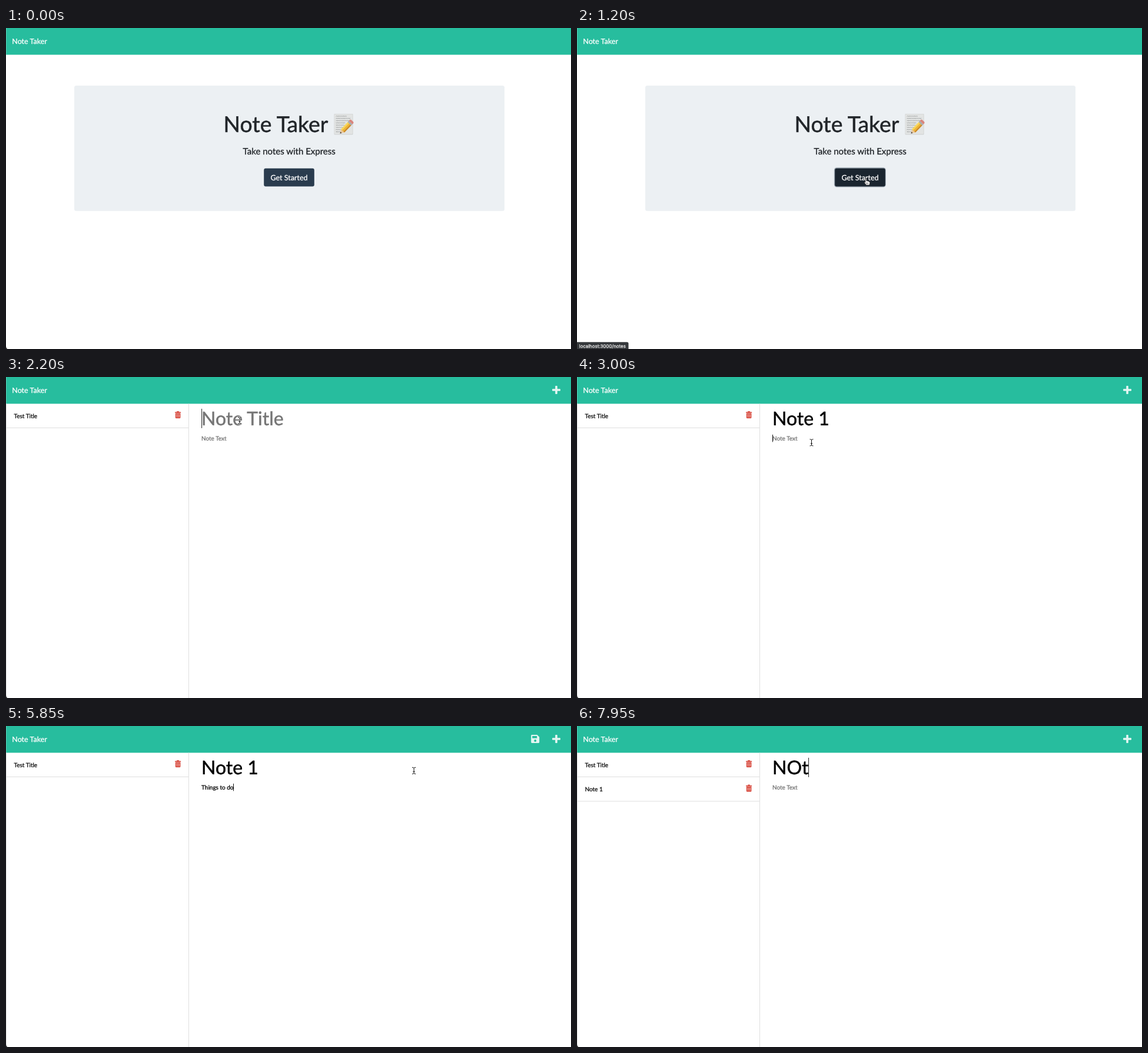
Recreate the animation shown at these times as an HTML page with a canvas. Size 960x546 px, loop 8 s.

```html
<!DOCTYPE html>
<html lang="en">
<head>
<meta charset="utf-8">
<title>Note Taker</title>
<style>
html, body { margin: 0; width: 100%; height: 100%; overflow: hidden; background: #fff; }
canvas { display: block; }
</style>
</head>
<body>
<canvas id="stage" width="960" height="546"></canvas>
<script>
const ctx = document.getElementById('stage').getContext('2d');
const LOOP = 8000, TICK = 50;
const TEAL = '#27bd9e', RULE = '#dfdfdf', HINT = '#757575', ICON = '#e4f6f2', RED = '#d8483c';
const LEFT = 332;

const HAND = new Path2D('M-1.3,.8a1.1,1.1 0 0 1 2.2,0V4.2q1.8-.9 2.1.4q1.7-.6 2 .7q1.6-.3 1.7 1.1V8q-.2,1.8-1.1,3.2H.3Q-1.2,8.8-3,6.9q-.4-1.5 1.7-.7Z');
const ARROW = new Path2D('M0,0V10.6L2.5,8.3L4.1,12L5.9,11.2L4.3,7.6H7.7Z');
const BEAM = new Path2D('M-2.6-5.6Q-.2-5.6 0-4.4Q.2-5.6 2.6-5.6M0-4.4V4.4M-2.6,5.6Q-.2,5.6 0,4.4Q.2,5.6 2.6,5.6M-1.2,1.6H1.2');

// Pointer legs: start, end, then quadratic curve points
const legs = [
  [250, 950, 944, -8, 700, 250, 494, 262],
  [950, 1100, 494, 262, 493, 258, 491, 256],
  [1350, 2000, 491, 256, 440, 190, 398, 78],
  [2000, 2200, 398, 78, 398, 75, 397, 74],
  [2850, 3000, 397, 84, 398, 100, 398.5, 111.5],
  [3200, 3250, 398.5, 111.5, 397, 109, 396, 107],
  [3450, 3500, 396, 107, 396, 106, 396, 106],
  [5500, 6150, 396, 106, 680, 100, 901, 19],
  [6450, 6850, 902, 19, 596, 144, 425, 72],
  [6850, 7150, 425, 72, 426, 72, 428, 72],
  [7400, 7450, 428, 72, 429, 72, 430, 71],
  [7650, 7700, 430, 71, 431, 71, 432, 71]
];

const titleKeys = [2300, 2350, 2400, 2450, 2500, 2800];
const textKeys = [4550, 4600, 4600, 4700, 4750, 4800, 4800, 4900, 4950, 5050, 5050, 5150];
const nextKeys = [7850, 7900, 7950];

const within = (t, a, b) => t >= a && t < b;
const typed = (str, keys, t) => str.slice(0, keys.filter(k => k <= t).length);
const blink = (t, since) => Math.floor((t - since + 10) / 255) % 2 === 0;
const lastKey = (keys, t, start) => Math.max(start, ...keys.filter(k => k <= t));

function rect(x, y, w, h, color, r = 0) {
  ctx.fillStyle = color;
  ctx.beginPath();
  ctx.roundRect(x, y, w, h, r);
  ctx.fill();
}

// A hairline stroke gives the fuller look of smoothed screen type
function text(str, x, y, size, color, align = 'left', family = 'Lato') {
  ctx.font = `${size}px ${family}, sans-serif`;
  ctx.fontKerning = 'normal';
  ctx.textRendering = 'geometricPrecision';
  ctx.textAlign = align;
  ctx.fillStyle = ctx.strokeStyle = color;
  ctx.lineWidth = .22 + size * .008;
  ctx.lineJoin = 'round';
  ctx.fillText(str, x, y);
  ctx.strokeText(str, x, y);
  return ctx.measureText(str).width;
}

function line(points, color, width) {
  ctx.strokeStyle = color;
  ctx.lineWidth = width;
  ctx.beginPath();
  points.forEach(([x, y]) => ctx.lineTo(x, y));
  ctx.stroke();
}

function memo(x, y) {
  ctx.save();
  ctx.translate(x, y);
  rect(0, 0, 32, 35.5, '#cfd1d1', 1);
  rect(.6, .4, 30.6, 34.2, '#e2e4e3', 1);
  for (let row = 0; row < 8; row++) {
    const end = row === 0 ? 22 : row < 3 ? 28 : 24 - row * 1.5;
    const pts = [];
    for (let px = 3; px < end; px += .8) {
      pts.push([px, 4 + row * 3.8 + Math.sin(px * 2.9 + row) * .8 * Math.sin(px * .7 + row * 2)]);
    }
    line(pts, '#8d9091', .7);
  }
  ctx.translate(10, 33.5);
  ctx.rotate(-.8);
  ctx.fillStyle = '#e9c79a';
  ctx.beginPath();
  ctx.moveTo(0, 0);
  ctx.lineTo(7, -4.2);
  ctx.lineTo(7, 4.2);
  ctx.fill();
  ctx.fillStyle = '#463c36';
  ctx.beginPath();
  ctx.moveTo(0, 0);
  ctx.lineTo(2.6, -1.5);
  ctx.lineTo(2.6, 1.5);
  ctx.fill();
  rect(6.5, -4.2, 17, 2.8, '#f8d75b');
  rect(6.5, -1.4, 17, 3, '#f2b82f');
  rect(6.5, 1.6, 17, 2.6, '#cf8b22');
  rect(23, -4.2, 3, 8.4, '#a9adb0');
  rect(26, -4.2, 4, 8.4, '#d9857d', [0, 2, 2, 0]);
  ctx.restore();
}

function trash(y) {
  rect(287, y + 1.2, 10.2, 1.5, RED, .5);
  rect(290, y, 4.2, 1.8, RED, .7);
  rect(287.8, y + 3.2, 8.6, 8.8, RED, [0, 0, 1.2, 1.2]);
  for (let i = 0; i < 3; i++) rect(289.5 + i * 2.25, y + 4.7, .8, 5.6, '#f6d5d2', .4);
}

function plus() {
  rect(928, 20.3, 14, 3.5, ICON, 1);
  rect(933.2, 15, 3.6, 14, ICON, 1);
}

function disk() {
  ctx.fillStyle = ICON;
  ctx.beginPath();
  ctx.moveTo(893.5, 15);
  ctx.lineTo(902.5, 15);
  ctx.lineTo(906.2, 18.7);
  ctx.lineTo(906.2, 27.6);
  ctx.quadraticCurveTo(906.2, 29, 904.8, 29);
  ctx.lineTo(893.5, 29);
  ctx.quadraticCurveTo(892.2, 29, 892.2, 27.6);
  ctx.lineTo(892.2, 16.4);
  ctx.quadraticCurveTo(892.2, 15, 893.5, 15);
  ctx.fill();
  rect(894.2, 17, 8, 3.8, TEAL, .3);
  ctx.beginPath();
  ctx.arc(899.2, 25, 2, 0, 7);
  ctx.fill();
}

function navbar() {
  rect(0, 0, 960, 45.6, TEAL);
  rect(0, 0, 1, 45.6, '#ffffff38');
  text('Note Taker', 10.3, 27, 12.5, '#fff');
}

function home(t) {
  navbar();
  rect(116, 98, 731, 213.3, '#ecf0f3', 3.5);
  text('Note Taker', 369.6, 176.8, 37.33, '#212529');
  memo(557.5, 146);
  text('Take notes with Express', 481.2, 214.6, 15, '#212529', 'center');
  const focus = t >= 1200, hover = t >= 900;
  if (focus) rect(436.8, 237.3, 88, 33.5, '#9fa9b3', 4.5);
  rect(438.2, 238.8, 85.6, 30.7, focus ? '#1a252f' : hover ? '#1e2b37' : '#2a3c4e', 3);
  text('Get Started', 481, 258.5, 12.5, '#fff', 'center');
}

function noteRow(name, i) {
  const y = 45.3 + i * 41.4;
  text(name, 13.5, y + 24.4, 10, '#111');
  trash(y + 13);
  rect(0, y + 40.8, 310.5, 1, RULE);
}

function field(str, hint, y, size) {
  if (str) return LEFT + text(str, LEFT, y, size, '#000');
  text(hint, LEFT, y, size, HINT);
  return LEFT + .5;
}

function notes(t) {
  const saved = t >= 6200;
  navbar();
  plus();
  if (within(t, 4550, 6200)) disk();
  rect(0, 45.6, 1, 501, RULE);
  rect(310, 45.6, 1, 501, RULE);
  noteRow('Test Title', 0);
  if (saved) noteRow('Note 1', 1);

  const title = saved ? typed('NOt', nextKeys, t) : typed('Note 1', titleKeys, t);
  const body = saved ? '' : typed('Things to do', textKeys, t);
  const titleEnd = field(title, 'Note Title', 82.3, 32);
  const bodyEnd = field(body, 'Note Text', 108, 10);

  const inTitle = within(t, 2000, 3000) && blink(t, lastKey(titleKeys, t, 2000)) ||
    t >= 6900 && blink(t, lastKey(nextKeys, t, 6900));
  const inBody = within(t, 3000, 6200) && (body || blink(t, 3000));
  if (inTitle) rect(titleEnd - .4, 54, 1, 33, '#222');
  if (inBody) rect(bodyEnd - .5, 98, 1, 12.5, '#111');
}

function status(t) {
  if (within(t, 1000, 1700)) {
    rect(0, 534.3, 87.5, 12, '#35383b', [0, 2.5, 0, 0]);
    text('localhost:3000/notes', 3.5, 544, 7.9, '#e8e8e8', 'left', 'Inter');
  } else {
    ctx.fillStyle = '#111';
    ctx.beginPath();
    ctx.moveTo(0, 541);
    ctx.quadraticCurveTo(.2, 545, 2.5, 546);
    ctx.lineTo(0, 546);
    ctx.fill();
  }
}

function pointerAt(t) {
  const [a, b, x0, y0, cx, cy, x1, y1] = legs.filter(l => l[0] <= t).pop();
  const p = Math.min(1, (t - a) / (b - a));
  const u = p * p * (3 - 2 * p), v = 1 - u;
  const mix = (m, n, o) => v * v * m + 2 * u * v * n + u * u * o;
  return [mix(x0, cx, x1), mix(y0, cy, y1)];
}

function pointer(t) {
  const hidden = t < 300 || within(t, 2300, 2900) || within(t, 4550, 5550) || t >= 7850;
  if (hidden) return;
  const [x, y] = pointerAt(t);
  let shape = ARROW;
  if (within(t, 900, 1400) || within(t, 6050, 6300)) shape = HAND;
  else if (t >= 1400 && x > 311 && y > 46) shape = BEAM;

  ctx.save();
  ctx.translate(x, y);
  ctx.lineJoin = ctx.lineCap = 'round';
  if (shape === HAND) {
    ctx.fillStyle = '#fff';
    ctx.fill(HAND);
    ctx.strokeStyle = '#222';
    ctx.lineWidth = .9;
    ctx.stroke(HAND);
    for (let i = 0; i < 3; i++) line([[.5 + i * 1.6, 7], [.5 + i * 1.6, 9.2]], '#333', .6);
  } else {
    ctx.strokeStyle = '#fff';
    ctx.lineWidth = shape === BEAM ? 2.2 : 1.6;
    ctx.stroke(shape);
    ctx.fillStyle = ctx.strokeStyle = '#111';
    ctx.lineWidth = 1;
    if (shape === BEAM) ctx.stroke(shape);
    else ctx.fill(shape);
  }
  ctx.restore();
}

function draw(now) {
  const t = Math.floor(now % LOOP / TICK) * TICK;
  rect(0, 0, 960, 546, '#fff');
  if (t < 1250) home(t);
  else notes(t);
  status(t);
  pointer(t);
}

let start;
function frame(now) {
  start ??= now;
  draw(now - start);
  requestAnimationFrame(frame);
}
draw(0);
requestAnimationFrame(frame);
</script>
</body>
</html>
```
